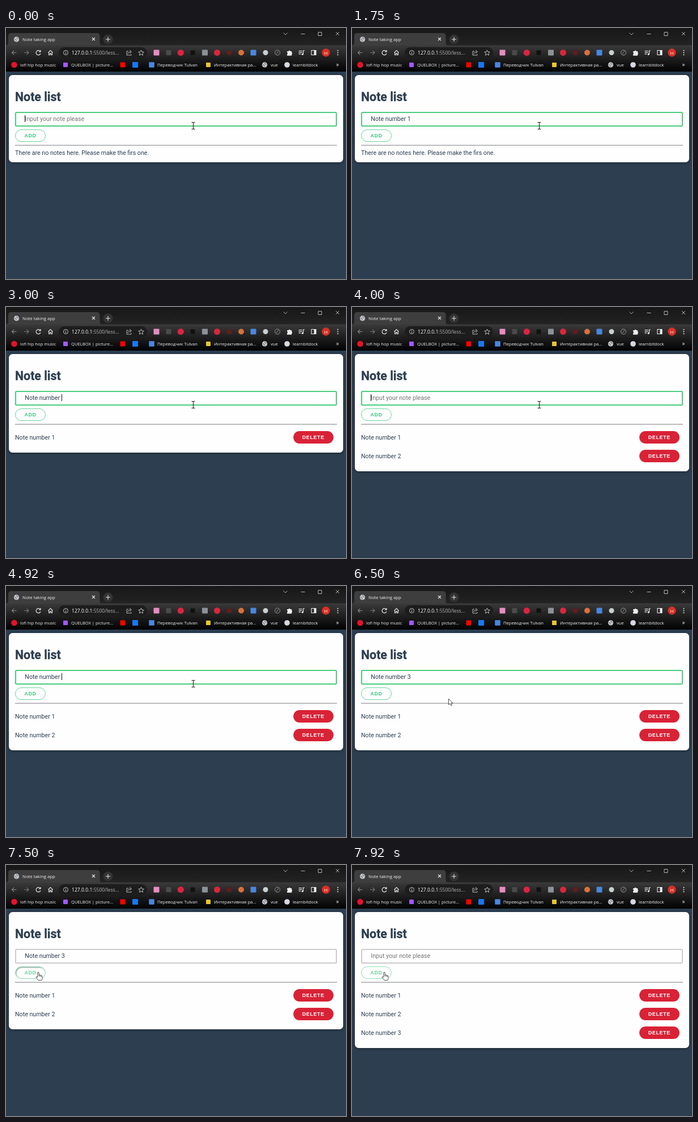
An HTML page that plays this animation: 600x443 px, repeating every 8 s.

```html
<!DOCTYPE html>
<html lang="en">
<head>
<meta charset="utf-8">
<title>Note taking app</title>
<style>
html, body { margin: 0; width: 100%; height: 100%; overflow: hidden; background: #2c3e50; }
#stage { position: relative; width: 600px; height: 443px; overflow: hidden; color: #2c3e50; font: 10.67px/14px Roboto, sans-serif; }
#stage div, #stage svg { position: absolute; box-sizing: border-box; white-space: pre; }
#ui { left: 0; top: 0; font-family: "Open Sans", sans-serif; font-weight: 500; }
#card { left: 5.3px; top: 83px; width: 589.7px; background: #fefefe; border-radius: 6.5px; box-shadow: 0 1px 5px #0006; }
#title { left: 16px; top: 109px; font-size: 21.33px; line-height: 26px; font-weight: 700; -webkit-text-stroke: .3px; }
#field { left: 16px; top: 148px; width: 568px; height: 25.5px; border: 2px solid; border-radius: 2.5px; }
#value { left: 33.3px; top: 154px; }
#caret { display: inline-block; width: 1px; height: 12px; margin-right: -1px; vertical-align: -2px; background: #111; }
.btn { height: 22.5px; border-radius: 12px; text-align: center; font: 700 8.89px/22px "Liberation Sans", sans-serif; letter-spacing: .67px; }
#add { left: 16px; top: 179px; width: 54px; height: 22px; border: 1px solid; line-height: 20px; }
#rule { left: 16px; top: 206px; width: 568px; height: 1.5px; background: #bbbcbe; }
#empty { left: 16px; top: 213.5px; }
.del { left: 506.5px; width: 71.5px; background: #d92236; color: #fff; }
.note { left: 16px; }
</style>
</head>
<body>
<div id="stage">
  <svg id="ui" width="600" height="77" fill="none"></svg>
  <div id="card"></div>
  <div id="title">Note list</div>
  <div id="field"></div>
  <div id="value"><span id="caret"></span><span id="text"></span></div>
  <div id="add" class="btn">ADD</div>
  <div id="rule"></div>
  <div id="empty">There are no notes here. Please make the firs one.</div>
  <div id="list"></div>
  <svg id="pointer" width="24" height="24" viewBox="-10 -10 24 24" style="overflow:visible"></svg>
</div>
<script>
const $ = id => document.getElementById(id);
const LOOP = 8000;

// Browser window
const label = (x, y, size, s, fill = "#f2f2f2") => `<text x="${x}" y="${y}" font-size="${size}" fill="${fill}">${s}</text>`;
const line = (d, stroke = "#e8e8e8", w = 1) => `<path d="${d}" stroke="${stroke}" stroke-width="${w}"/>`;
const dot = (x, y, r, fill) => `<circle cx="${x}" cy="${y}" r="${r}" fill="${fill}"/>`;
const ring = (x, y, r, stroke) => `<circle cx="${x}" cy="${y}" r="${r}" stroke="${stroke}"/>`;
const box = (x, y, s, fill) => `<rect x="${x - s / 2}" y="${y - s / 2}" width="${s}" height="${s}" rx="1" fill="${fill}"/>`;
const globe = (x, y) => dot(x, y, 4.7, "#c4c7cb") +
  line(`M${x - 3.8} ${y - .5}l3 1l.5 3M${x + .5} ${y - 3.8}v2l3 1.500`, "#55585c", .9);

$("ui").innerHTML = `
  <defs>
    <linearGradient id="strip" x2="0" y2="1"><stop stop-color="#171717"/><stop offset="1" stop-color="#232323"/></linearGradient>
    <linearGradient id="bar" x2="0" y2="1"><stop stop-color="#3a3a3b"/><stop offset="1" stop-color="#020202"/></linearGradient>
  </defs>
  <rect width="600" height="31" fill="url(#strip)"/>
  <rect y="30.500" width="600" height="46.500" fill="url(#bar)"/>
  <path d="M0 31Q4 31 4 27V14Q4 9 9 9H160Q165.500 9 165.500 14V27Q165.500 31 170 31Z" fill="#3e3e3f"/>` +
  globe(18.5, 20) + label(29, 22.8, 7.8, "Note taking app") +
  dot(180, 20, 8.5, "#333") +
  line("M152 17l5 5m0-5l-5 5M176 20h8m-4-4v8", "#e8e8e8", 1.1) +
  line("M489.500 8.500l3.500 3.500l3.500-3.500", "#aaa") +
  line("M520.500 10.500h7M551 7.500h6v6h-6zM582 7l6 6m0-6l-6 6", "#ddd", .8) +
  line("M18.500 43.500h-8m3.700-3.700l-3.700 3.700l3.700 3.700", "#8a8a8a", 1.1) +
  line("M32 43.500h8m-3.700-3.700l3.700 3.700l-3.700 3.700", "#777", 1.1) +
  line("M60.500 41.500a4 4 0 1 0 .4 3.500M61 39v3h-3", "#e8e8e8", 1.2) +
  line("M74.500 43.500l4-4l4 4M75.500 43v4.500h2v-3h2v3h2v-4.500", "#e8e8e8", 1.1) +
  `<rect x="93" y="34" width="156" height="19.500" rx="9.700" fill="#1d1d1e"/>` +
  ring(105.5, 43.5, 4, "#c8c8c8") + line("M105.500 43v3m0-5v1", "#c8c8c8") +
  label(116, 46.8, 8.6, '127.0.0.1<tspan fill="#b4b4b4">:5500/less...</tspan>', "#fff") +
  line("M216 41h-3v7h8v-2M215 46q0-4 5-4m-2-3l3.500 3l-3.500 3", "#c8c8c8", .9) +
  line("M238.500 39l1.400 3.100l3.400 .3l-2.600 2.300l.8 3.400l-3-1.800l-3 1.800l.8-3.400l-2.600-2.300l3.400-.3z", "#d0d0d0", .9) +
  box(265.5, 43.5, 10, "#e88bc0") + box(287, 43.5, 9, "#4a4a4a") + dot(308.3, 43.5, 5.6, "#dc2440") +
  box(329.5, 43.5, 8, "#111") + box(351, 43.5, 10, "#8b9297") + dot(372.5, 43.5, 5.5, "#d8273b") +
  dot(394, 43.5, 4.5, "#641c1b") + dot(415, 43.5, 5, "#d9713a") + box(436.5, 43.5, 10, "#4b86dc") +
  dot(458, 43.5, 4.5, "#c9d0d0") + ring(479, 43.5, 4.5, "#999") + line("M477 46l4-5", "#999") +
  `<path d="M496 41h2.500a1.700 1.700 0 0 1 3.200 0h2.500v2.500a1.700 1.700 0 0 1 0 3v2.300h-8.200v-2.500a1.600 1.600 0 0 0 0-3z" fill="#eee"/>` +
  line("M516.500 40.500h6m-6 2.700h6m-6 2.700h3.500M524.500 46v-6h2.500", "#eee", 1.2) + dot(523.2, 46.3, 1.6, "#eee") +
  line("M539 39.500h8v8h-8z", "#eee", 1.1) + `<path d="M543.500 39.500h3.500v8h-3.500z" fill="#eee"/>` +
  dot(564.5, 43.5, 7.2, "#d93025") + label(561.6, 46.5, 8, "H", "#fff") +
  [39.8, 43.5, 47.2].map(y => dot(585.5, y, 1, "#eee")).join("") +
  dot(14.5, 65, 5.3, "#e8112a") + label(25, 67.8, 7.65, "lofi hip hop music") +
  box(105, 65, 8, "#a259ff") + label(115, 67.8, 7.65, "QUELBOX | picture...") +
  box(206, 65, 9, "#f00") + box(228, 65, 10, "#1778f2") +
  box(257, 65, 9.5, "#4b86dc") + label(267, 67.8, 7.65, "Переводчик Tulvan") +
  box(357, 65, 8, "#e8c52c") + label(367, 67.8, 7.65, "Интерактивная ра...") +
  globe(456.5, 65) + label(467, 67.8, 7.65, "vue") +
  dot(496, 65, 4.8, "#d8d8e2") + label(506, 67.8, 7.65, "learnbitdock") +
  label(582.5, 68, 10, "»");

// Typing: [time, text, notes so far, optional start of the caret blink]
const N = "Note number ";
const steps = [
  [0, "", 0], [80, "N", 0], [170, "Not", 0], [250, "Note ", 0], [330, "Note nu", 0], [420, "Note num", 0],
  [580, "Note numb", 0], [670, "Note numbe", 0], [750, "Note number", 0], [1080, N, 0], [1250, N + 1, 0],
  [1830, "", 1, 1750], [2580, "No", 1], [2670, "Note n", 1], [2750, "Note numb", 1], [2830, N, 1],
  [3500, N + 2, 1], [4000, "", 2], [4830, "Note nu", 2], [4920, N, 2],
  [5580, N + 3, 2, 5670], [7600, "", 3]
];

const shapes = {
  beam: '<path d="M-3 -6H-.700L0 -5L.700 -6H3M0 -5V5M-3 6H-.700L0 5L.700 6H3" fill="none" stroke="#222" stroke-width="1.100"/>',
  arrow: '<path d="M0 0V10.500L2.400 8.400L4.100 12L5.900 11.200L4.300 7.700H7.500Z" fill="#fff" stroke="#222" stroke-width=".8"/>',
  hand: '<path d="M-1.200 .800Q-1.200 -.300 0 -.300T1.200 .800V4.500Q3 3.700 3.300 5Q5 4.500 5.300 5.800Q7 5.500 7 7V10Q7 12 5.500 14H0Q-1 12 -4 9.300Q-4.300 7.300 -2.500 7.700L-1.200 8.700ZM1.200 4.500V7M3.300 5V7.500M5.300 5.800V8" fill="#fff" stroke="#222" stroke-width=".8"/>'
};

const clamp = x => Math.min(1, Math.max(0, x));
const ramp = (t, a, b) => { const u = clamp((t - a) / (b - a)); return u * u * (3 - 2 * u); };
const mix = (a, b, k) => `rgb(${a.map((v, i) => v + (b[i] - v) * k)})`;
let shownNotes, shownShape;

function drawNotes(count) {
  if (count === shownNotes) return;
  shownNotes = count;
  $("card").style.height = (count ? 141 + 33 * count : 154) + "px";
  $("empty").style.display = count ? "none" : "";
  $("list").innerHTML = Array.from({ length: count }, (_, i) =>
    `<div class="note" style="top:${223.5 + 33 * i}px">${N}${i + 1}</div>
     <div class="btn del" style="top:${218.5 + 33 * i}px">DELETE</div>`).join("");
}

function drawPointer(t) {
  const p = ramp(t, 6100, 6820);
  const x = 330.5 - 273.5 * p, y = 172.5 + 17 * p + 68 * p * (1 - p);
  const shape = y < 174 ? "beam" : x < 70 ? "hand" : "arrow";
  if (shape !== shownShape) $("pointer").innerHTML = shapes[shownShape = shape];
  $("pointer").style.transform = `translate(${x - 10}px,${y - 10}px)`;
}

function draw(t) {
  const [start, text, count, blink = start] = steps.findLast(s => s[0] <= t);
  drawNotes(count);
  drawPointer(t);
  const blur = ramp(t, 7000, 7250), hover = ramp(t, 6700, 6950);
  const press = ramp(t, 7000, 7250) * (1 - ramp(t, 7600, 7900));

  $("text").textContent = text || "Input your note please";
  $("text").style.color = text ? "#2c3e50" : "#757575";
  const caret = $("caret");
  if (text) $("text").after(caret); else $("text").before(caret);
  caret.style.visibility = t < 7000 && Math.floor(Math.max(0, t - blink) / 500) % 2 === 0 ? "visible" : "hidden";

  $("field").style.borderColor = mix([74, 204, 126], [204, 204, 204], blur);
  const add = $("add").style;
  add.color = mix([61, 196, 125], [105, 209, 155], hover);
  add.borderColor = mix([105, 213, 155], [145, 221, 182], hover);
  add.boxShadow = `inset 1px 1px 2px rgba(30,80,70,${.6 * press})`;
}

function frame(now) {
  draw(now % LOOP);
  requestAnimationFrame(frame);
}
draw(0);
requestAnimationFrame(frame);
</script>
</body>
</html>
```
